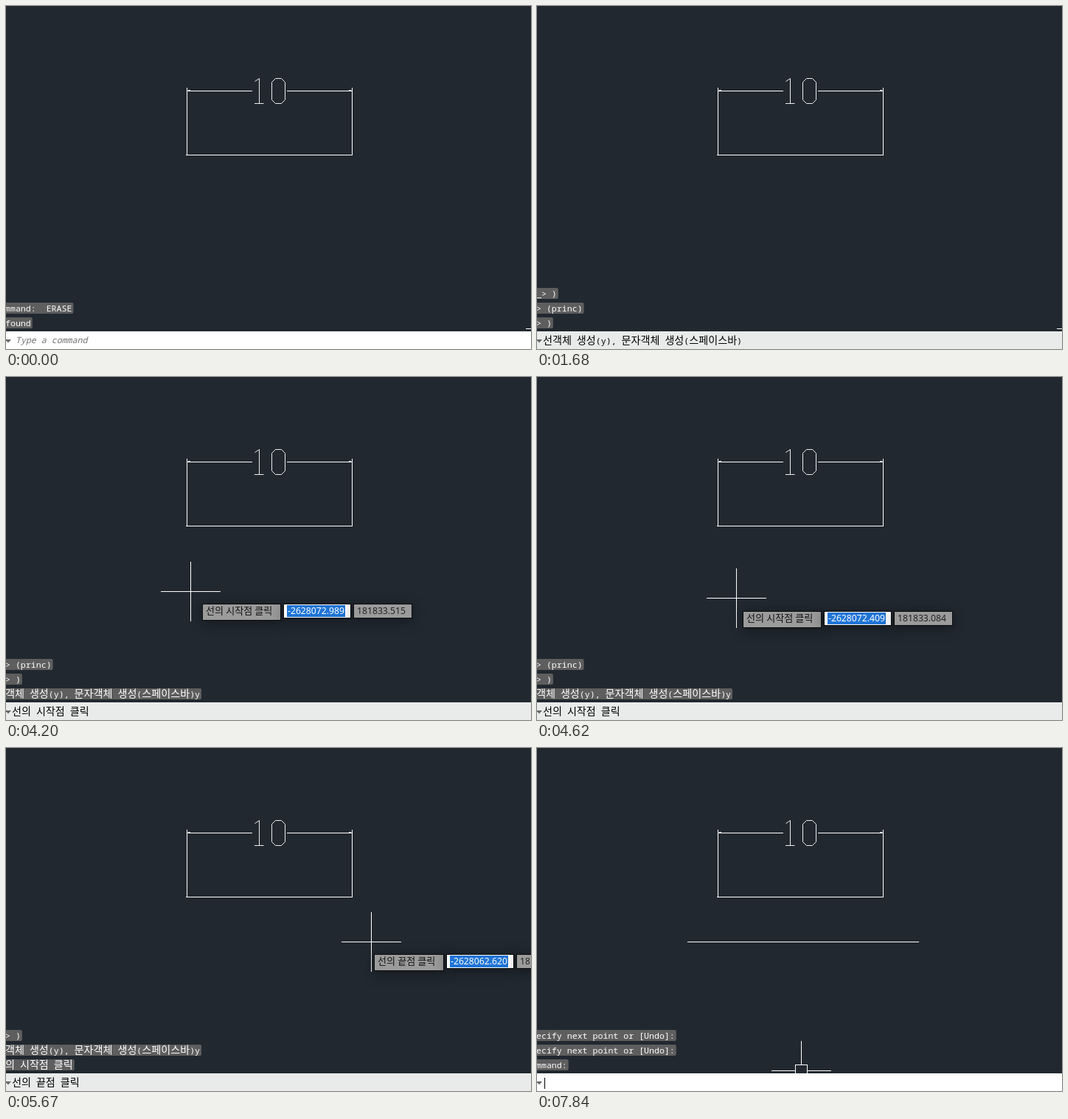
These frames come from a looping animation (712x466 px, 8 s). An HTML page with a canvas:

```html
<!DOCTYPE html>
<html lang="ko">
<head>
<meta charset="utf-8">
<style>
  html, body { margin: 0; width: 712px; height: 466px; overflow: hidden; background: #212830; }
  canvas { display: block; }
</style>
</head>
<body>
<canvas width="712" height="466"></canvas>
<script>
const ctx = document.querySelector('canvas').getContext('2d');
const LOOP = 8000, STEP = 70;
const MONO = '11.6px "Noto Sans Mono", monospace';
const MONO_KO = '14.1px "Noto Sans CJK KR", "Noto Sans CJK", sans-serif';
const UI = '12.2px "Noto Sans", sans-serif';
const UI_KO = '13.05px "Noto Sans CJK KR", "Noto Sans CJK", sans-serif';

const ASK_TYPE = '선객체 생성(y), 문자객체 생성(스페이스바)';
const ASK_START = '선의 시작점 클릭';
const ASK_END = '선의 끝점 클릭';
const TYPED = '객체 생성(y), 문자객체 생성(스페이스바)y';
const HINT = 'Type a command';

const code = [
  'mmand: (defun c:dl (/ yn p1 p2)',
  '_> (setq yn (getstring "\\n' + ASK_TYPE + '"))',
  '_> (if (= yn "y")',
  '_> (progn',
  '_> (setq p1 (getpoint "\\n' + ASK_START + '"))',
  '_> (setq p2 (getpoint "\\n' + ASK_END + '"))',
  '_> (command "line" p1 p2 "")',
  '_> )', '> (princ)', '> )'
];
const found = ['mmand:  ERASE', 'found'];
const drawn = ['ecify next point or [Undo]:', 'ecify next point or [Undo]:', 'mmand:'];

// start time, bar kind, bar text, history lines
const states = [
  [0, 'hint', HINT, found],
  [420, 'caret', '', found],
  [630, 'caret', '', code.slice(0, 3)],
  [700, 'caret', '', code.slice(1, 4)],
  [770, 'caret', '', code.slice(2, 5)],
  [840, 'caret', '', code.slice(3, 6)],
  [1120, 'caret', '', code.slice(5, 8)],
  [1190, 'caret', '', code.slice(6, 9)],
  [1260, 'caret', '', code.slice(7)],
  [1680, 'ask', ASK_TYPE, code.slice(7)],
  [3360, 'ask', ASK_START, [...code.slice(8), TYPED]],
  [5180, 'ask', ASK_END, [code[9], TYPED, '의 시작점 클릭']],
  [6160, 'ask', '', drawn],
  [6580, 'hint', HINT, drawn],
  [7840, 'caret', '', drawn]
];

// time, x, y of the crosshair
const path = [
  [1750, 745, 438], [1820, 600, 390], [1960, 300, 285], [2030, 256, 271],
  [3990, 256, 271], [4060, 254, 278], [4130, 250, 291], [4200, 250, 291],
  [4410, 256, 301], [4480, 256, 301], [4690, 277, 300], [4830, 232, 272],
  [4900, 217.2, 264.2], [4970, 215, 264], [5040, 204, 263], [5180, 204, 263],
  [5320, 270, 263], [5460, 425, 263], [5600, 482.5, 263], [5670, 495, 263],
  [5880, 517, 263], [6440, 517, 263], [6720, 470, 330], [6930, 390, 415],
  [7140, 358, 438]
];

function cursorAt(t) {
  const i = path.findIndex(p => p[0] > t);
  if (i === 0) return path[0].slice(1);
  if (i < 0) return path[path.length - 1].slice(1);
  const [t0, x0, y0] = path[i - 1], [t1, x1, y1] = path[i];
  const k = (t - t0) / (t1 - t0);
  return [x0 + (x1 - x0) * k, y0 + (y1 - y0) * k];
}

function rect(x, y, w, h, color) {
  ctx.fillStyle = color;
  ctx.fillRect(x, y, w, h);
}
const hLine = (x0, x1, y) => rect(x0, y, x1 - x0, 1, '#fff');
const vLine = (x, y0, y1) => rect(x, y0, 1, y1 - y0, '#fff');

// Draws Latin and Hangul runs in their own fonts; returns the width.
function text(str, x, y, color, latin, hangul, show = true) {
  let w = 0;
  ctx.fillStyle = color;
  for (const run of str.split(/([가-힣]+)/)) {
    ctx.font = /[가-힣]/.test(run) ? hangul : latin;
    if (show) ctx.fillText(run, x + w, y);
    w += ctx.measureText(run).width;
  }
  return w;
}
const mono = (s, x, y, color, show) => text(s, x, y, color, MONO, MONO_KO, show);
const ui = (s, x, y, color, show) => text(s, x, y, color, UI, UI_KO, show);

function drawDimension() {
  vLine(245, 111, 202);
  vLine(469, 111, 202);
  hLine(246, 334, 115);
  hLine(381, 469, 115);
  hLine(244, 470, 202);
  hLine(247, 250, 114);
  hLine(465, 468, 114);
  ctx.strokeStyle = '#eee';
  ctx.lineWidth = 1;
  ctx.stroke(new Path2D(
    'M337.5 102.5L343.5 98.5V132.5M337 132.5H349.5' +
    'M365.5 98.5H373.5L378.5 103.5V127.5L373.5 132.5H365.5L360.5 127.5V103.5Z'));
}

function drawCursor(x, y, boxed) {
  x = Math.round(x);
  y = Math.round(y);
  if (!boxed) {
    hLine(x - 40, x + 41, y);
    vLine(x, y - 40, y + 41);
    return;
  }
  hLine(x - 40, x - 8, y);
  hLine(x + 9, x + 41, y);
  vLine(x, y - 40, y - 8);
  vLine(x, y + 9, y + 41);
  ctx.strokeStyle = '#fff';
  ctx.lineWidth = 1;
  ctx.strokeRect(x - 7.5, y - 7.5, 16, 16);
}

function panel(x, y, w, h, color) {
  ctx.shadowColor = 'rgba(0,0,0,.4)';
  ctx.shadowBlur = 18;
  ctx.shadowOffsetY = 3;
  rect(x, y, w, h, '#0c0c0c');
  ctx.shadowColor = 'transparent';
  rect(x + 1, y + 1, w - 2, h - 2, color);
}

function drawTooltip(t) {
  const [cx, cy] = cursorAt(t - STEP);
  const x = Math.round(cx) + 16, y = Math.round(cy) + 17;
  const label = t < 3360 ? ASK_TYPE : t < 5180 ? ASK_START : ASK_END;
  const w = Math.round(ui(label, 0, 0, '', false)) + 17;
  const inputX = x + w + 3;
  panel(x, y, w, 23, '#9b9b9b');
  ui(label, x + 5, y + 14, '#111');
  if (t < 3360) {
    panel(inputX, y, 30, 20, '#fff');
    if (t >= 3150) ui('y', inputX + 5, y + 14, '#111');
    else if (t >= 3010) rect(inputX + 5, y + 3, 16, 14, '#2678d9');
    return;
  }
  const east = (-2628072.989 + (cx - 250) * .0446).toFixed(3);
  const north = (181833.515 - (cy - 291) * .0446).toFixed(3);
  panel(inputX, y, 92, 20, '#fff');
  rect(inputX + 5, y + 2, 79, 16, '#1f74d6');
  ui(east, inputX + 6, y + 14, '#fff');
  panel(inputX + 95, y, 80, 20, '#9b9b9b');
  ui(north, inputX + 100, y + 14, '#222');
}

function drawHistory(lines) {
  lines.forEach((line, i) => {
    const y = 443 - 20 * (lines.length - i);
    ctx.fillStyle = '#5e5e5e';
    ctx.beginPath();
    ctx.roundRect(-4, y, mono(line, 0, 0, '', false) + 5, 15, 2);
    ctx.fill();
    mono(line, -1, y + 12, '#fff');
  });
}

function drawBar(kind, str) {
  rect(0, 442, 712, 24, kind === 'ask' ? '#e9ebea' : '#fff');
  ctx.fillStyle = '#666';
  ctx.fill(new Path2D('M-1 453H7L3 457.5Z'));
  if (kind === 'hint') text(str, 13, 458, '#707070', 'italic ' + MONO, MONO_KO);
  else if (kind === 'caret') rect(10, 448, 1, 15, '#000');
  else mono(str, 8, 459, '#000');
}

function draw(t) {
  const [, kind, str, lines] = states.findLast(s => s[0] <= t);
  rect(0, 0, 712, 466, '#212830');
  drawDimension();
  if (t >= 6160) hLine(204, 518, 263);
  drawHistory(lines);
  if (t < 6020 || t >= 6160) drawCursor(...cursorAt(t), t < 3430 || t >= 6160);
  if (t >= 1820 && t < 6020) drawTooltip(t);
  drawBar(kind, str);
}

function frame() {
  draw(Math.floor(performance.now() % LOOP / STEP) * STEP);
  requestAnimationFrame(frame);
}
frame();
</script>
</body>
</html>
```
